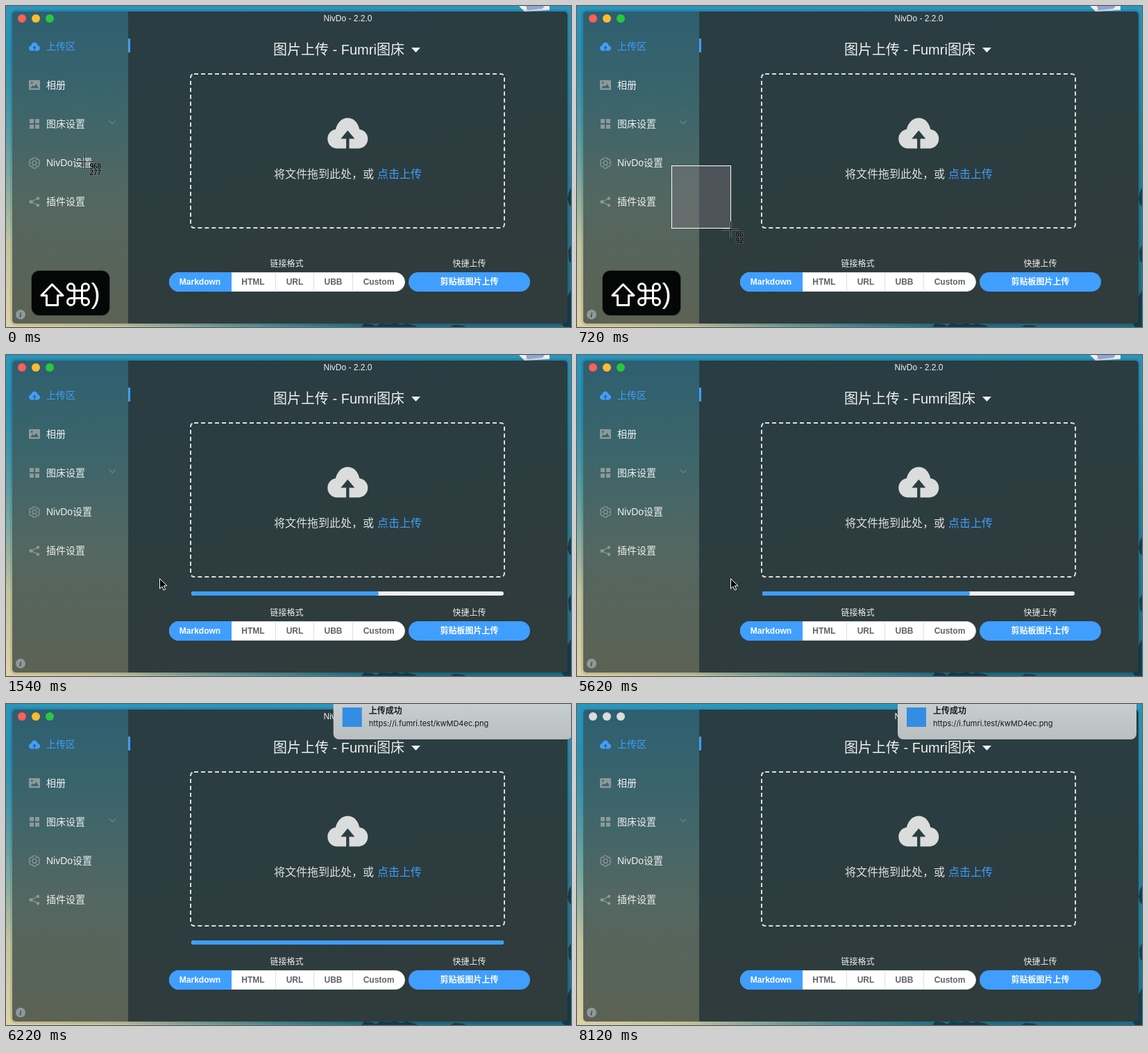
These frames come from a looping animation (814 by 463 pixels, 8710 ms). An HTML page:

```html
<!DOCTYPE html>
<html lang="zh-CN">
<head>
<meta charset="utf-8">
<title>NivDo</title>
<style>
  html, body { margin: 0; width: 100%; height: 100%; overflow: hidden; }
  svg { position: absolute; left: 0; top: 0; }
  text { font-family: "Liberation Sans", "Noto Sans CJK SC", "Noto Sans CJK", sans-serif; font-size: 12px; font-weight: 500; fill: #eff1f1; white-space: pre; }
  .menu { font-size: 14px; }
  .mid { text-anchor: middle; }
  .bold { font-weight: 700; }
  .tab { text-anchor: middle; font-weight: 700; fill: #606266; }
  .icon { fill: #8d999a; }
  .line { fill: none; stroke: #8d999a; stroke-width: 1.2; }
  .coords text { font-size: 10px; font-weight: 700; fill: #080808; stroke: rgba(255,255,255,.35); stroke-width: 1px; paint-order: stroke; }
</style>
</head>
<body>
<svg width="814" height="463" viewBox="0 0 814 463">
  <defs>
    <linearGradient id="sea" x2="0" y2="1">
      <stop offset="0" stop-color="#2996bd"/><stop offset=".5" stop-color="#22829f"/><stop offset="1" stop-color="#1c6f89"/>
    </linearGradient>
    <radialGradient id="sand" gradientUnits="userSpaceOnUse" cx="0" cy="0" r="1" gradientTransform="translate(0 463) scale(540 400)">
      <stop offset="0" stop-color="#dfd3a6"/><stop offset=".3" stop-color="#ccc9a0" stop-opacity=".95"/><stop offset="1" stop-color="#7db3b0" stop-opacity="0"/>
    </radialGradient>
    <linearGradient id="side" x2="0" y2="1">
      <stop offset="0" stop-color="#2e5f70"/><stop offset=".3" stop-color="#3c656b"/><stop offset=".6" stop-color="#536761"/><stop offset="1" stop-color="#5c6254"/>
    </linearGradient>
    <linearGradient id="main" x2=".3" y2="1">
      <stop offset="0" stop-color="#2a3d43"/><stop offset=".5" stop-color="#2b3d40"/><stop offset="1" stop-color="#303b3c"/>
    </linearGradient>
    <linearGradient id="glass" x2="0" y2="1">
      <stop offset="0" stop-color="#ccd4d5"/><stop offset="1" stop-color="#babfbf"/>
    </linearGradient>
    <clipPath id="frame"><rect x="9" y="8" width="800" height="450" rx="5"/></clipPath>
    <path id="cloud" d="M14 44C6 44 0 38 0 30C0 23 5 17.5 11.5 16.5C14 6.5 20.5 0 29 0S44 6.5 46 16.5C53 17.5 58 23 58 30C58 38 52 44 44 44H31.2V30H39L29 18 19 30H26.8V44Z"/>
  </defs>

  <!-- desktop -->
  <rect width="814" height="463" fill="url(#sea)"/>
  <rect width="814" height="463" fill="url(#sand)"/>
  <path fill="#123f50" d="M512 463l4-5 12 1 5 3 6-4 15 1 8-2 6 3 9-2 12 3 4 2zM640 463l6-3 12 1 5 2zM814 262l-3 6-2 10 2 8 3 3zM814 345l-4 8 1 14 3 4zM814 410l-5 9v30l-8 10 3 4h10z"/>
  <path fill="#edf0f2" d="M739 0h44v6l-36 2z"/>
  <path fill="#8ea5d6" d="M749 0h27l-3 4-22 2z"/>

  <!-- window -->
  <rect id="shadow" x="8" y="7" width="802" height="452" rx="6" fill="none" stroke="#000" stroke-width="4"/>
  <g clip-path="url(#frame)">
    <rect x="9" y="8" width="167" height="450" fill="url(#side)"/>
    <rect x="176" y="8" width="633" height="450" fill="url(#main)"/>
  </g>
  <g id="lights"><circle cx="23" cy="18" r="6"/><circle cx="43" cy="18" r="6"/><circle cx="63" cy="18" r="6"/></g>
  <text class="mid" x="492.5" y="22">NivDo - 2.2.0</text>

  <!-- sidebar -->
  <rect x="176" y="47" width="3" height="20" fill="#409eff"/>
  <use href="#cloud" transform="translate(33 52.5) scale(.276)" fill="#409eff"/>
  <g class="icon">
    <path fill-rule="evenodd" d="M34 107h14q1 0 1 1v12q0 1-1 1H34q-1 0-1-1v-12q0-1 1-1zM35 118.500h12l-3.500-6-3 4-2-2zM36 109.500v2.500h2.500v-2.500z"/>
    <path d="M34 163h6v6h-6zM42 163h6v6h-6zM34 171h6v6h-6zM42 171h6v6h-6z"/>
    <circle cx="36" cy="282.500" r="2.500"/><circle cx="46" cy="277.500" r="2.200"/><circle cx="46" cy="287.500" r="2.200"/>
    <circle cx="21" cy="445" r="7"/>
  </g>
  <path class="line" d="M46 277.500l-10 5 10 5"/>
  <path class="line" d="M39 219h4l1 2.300 2.600-.3 2 3.400-1.600 2 1.600 2-2 3.400-2.600-.3-1 2.300h-4l-1-2.300-2.600.3-2-3.400 1.600-2-1.600-2 2-3.400 2.600.3z"/>
  <circle class="line" cx="41" cy="226.400" r="3"/>
  <path class="line" opacity=".6" d="M148.500 165.500l4.700 4.500 4.700-4.500"/>
  <text class="mid" x="20.800" y="449" style="font:italic 700 11px 'Liberation Serif',serif;fill:#3d4743">i</text>
  <g id="menu"></g>

  <!-- upload area -->
  <text x="385" y="70" style="font-size:20px">图片上传 - Fumri图床</text>
  <path fill="#eff1f1" d="M584 60h13l-6.500 7z"/>
  <rect x="266" y="98" width="452" height="222" rx="5" fill="none" stroke="#dcdfdf" stroke-width="2" stroke-dasharray="6 4"/>
  <use href="#cloud" transform="translate(463.3 161.500)" fill="#dadddc"/>
  <text x="386" y="248" style="font-size:16px;fill:#dfe2e2">将文件拖到此处，或</text>
  <text x="535" y="248" style="font-size:16px;fill:#409eff">点击上传</text>
  <g id="progress">
    <rect x="267" y="341" width="450" height="6" rx="3" fill="#ebeef5"/>
    <rect id="fill" x="267" y="341" height="6" rx="3" fill="#409eff"/>
  </g>
  <text class="mid" x="404.500" y="376">链接格式</text>
  <text class="mid" x="667.500" y="376">快捷上传</text>
  <rect x="235.500" y="384.500" width="339" height="27" rx="13.500" fill="#fff" stroke="#dcdfe6"/>
  <path fill="#409eff" d="M325 384h-76a14 14 0 0 0 0 28h76z"/>
  <path stroke="#dcdfe6" d="M388.500 384v28M443.500 384v28M499.500 384v28"/>
  <g id="tabs"></g>
  <rect x="580" y="384" width="175" height="28" rx="14" fill="#409eff"/>
  <text class="mid bold" x="667.500" y="402" style="fill:#fff">剪贴板图片上传</text>

  <!-- pressed keys -->
  <g id="keys" fill="none" stroke="#fff" stroke-width="3">
    <rect x="37" y="382" width="112" height="64" rx="11" fill="#050707" stroke="#000" stroke-opacity=".25" stroke-width="2"/>
    <path d="M66.500 401.500L82 417.500H74.500V431.500H58.500V417.500H51Z" stroke-linejoin="round"/>
    <path d="M98.500 410.500h11v11h-11zh-5a5 5 0 1 1 5-5zM109.500 410.500v-5a5 5 0 1 1 5 5zM109.500 421.500h5a5 5 0 1 1-5 5zM98.500 421.500v5a5 5 0 1 1-5-5z"/>
    <text x="122.500" y="429" stroke="none" style="font-size:40px;fill:#fff">)</text>
  </g>

  <!-- pointers -->
  <rect id="marquee" x="136.500" y="230.500" fill="#807880" fill-opacity=".4" stroke="#fff"/>
  <g id="cross" class="coords">
    <path d="M-12 0H12M0-12V12" stroke="#fff" stroke-opacity=".25" stroke-width="3"/>
    <path d="M-12 0H12M0-12V12" stroke="#111"/>
    <text id="cx" x="7" y="10.500"></text>
    <text id="cy" x="7" y="19.500"></text>
  </g>
  <path id="arrow" fill="#000" stroke="#fff" d="M221.500 322.500v14.500l3.400-3.200 2.300 5.300 2.400-1-2.300-5.200h4.600z"/>

  <!-- notification -->
  <g id="note">
    <rect y="-20" width="344" height="71" rx="8" fill="url(#glass)"/>
    <rect x="13" y="5" width="28" height="28" fill="#348de4"/>
    <text class="bold" x="51" y="14" style="fill:#1b2022">上传成功</text>
    <text x="51" y="32" style="font:11px Inter,sans-serif;fill:#16191a">https://i.fumri.test/kwMD4ec.png</text>
  </g>
</svg>

<script>
const LOOP = 8710;
const $ = id => document.getElementById(id);
const set = (id, attrs) => { for (const k in attrs) $(id).setAttribute(k, attrs[k]); };
const show = (id, on) => { $(id).style.display = on ? '' : 'none'; };
const ramp = (t, a, b) => Math.min(1, Math.max(0, (t - a) / (b - a)));
const ease = (t, a, b) => { const x = ramp(t, a, b); return x * x * (3 - 2 * x); };

$('menu').innerHTML = ['上传区', '相册', '图床设置', 'NivDo设置', '插件设置'].map((s, i) =>
  `<text class="menu" x="58" y="${63 + 56 * i}"${i ? '' : ' style="fill:#409eff"'}>${s}</text>`).join('');
$('tabs').innerHTML = [['Markdown', 279.5], ['HTML', 356], ['URL', 416], ['UBB', 471.5], ['Custom', 537]].map(([s, x], i) =>
  `<text class="tab" x="${x}" y="402"${i ? '' : ' style="fill:#fff"'}>${s}</text>`).join('');

function drawPointer(t) {
  const step = Math.floor(t / 60) * 60;
  const move = ramp(step, 0, 180), drag = ease(step, 420, 720);
  const x = Math.round(113 + 23 * move + 85 * drag);
  const y = Math.round(224 + 7 * move + 91 * drag);
  const dragging = drag > 0, aiming = t < 780;
  show('cross', aiming);
  show('marquee', aiming && dragging);
  show('arrow', !aiming && t < 5680);
  set('cross', { transform: `translate(${x + .5} ${y + .5})` });
  set('marquee', { width: x - 136, height: Math.max(0, y - 232) });
  $('cx').textContent = dragging ? x - 135 : x + 855;
  $('cy').textContent = dragging ? y - 230 : y + 53;
}

function draw(t) {
  drawPointer(t);
  set('keys', { opacity: 1 - ramp(t, 800, 1130) });

  set('progress', { opacity: ease(t, 1340, 1540) * (1 - ease(t, 6590, 6740)) });
  set('fill', { width: 450 * (.6 * ease(t, 1340, 1540) + .4 * ease(t, 5570, 5770)) });

  set('note', { transform: `translate(${820 - 358 * ease(t, 5680, 6280)} 0)` });

  const active = t < 8120;
  set('shadow', { 'stroke-opacity': active ? .1 : .03 });
  ['#ff5f57', '#febc2e', '#28c840'].forEach((c, i) =>
    $('lights').children[i].setAttribute('fill', active ? c : '#d9dddd'));
}

const start = performance.now();
function tick() {
  draw((performance.now() - start) % LOOP);
  requestAnimationFrame(tick);
}
tick();
</script>
</body>
</html>
```
